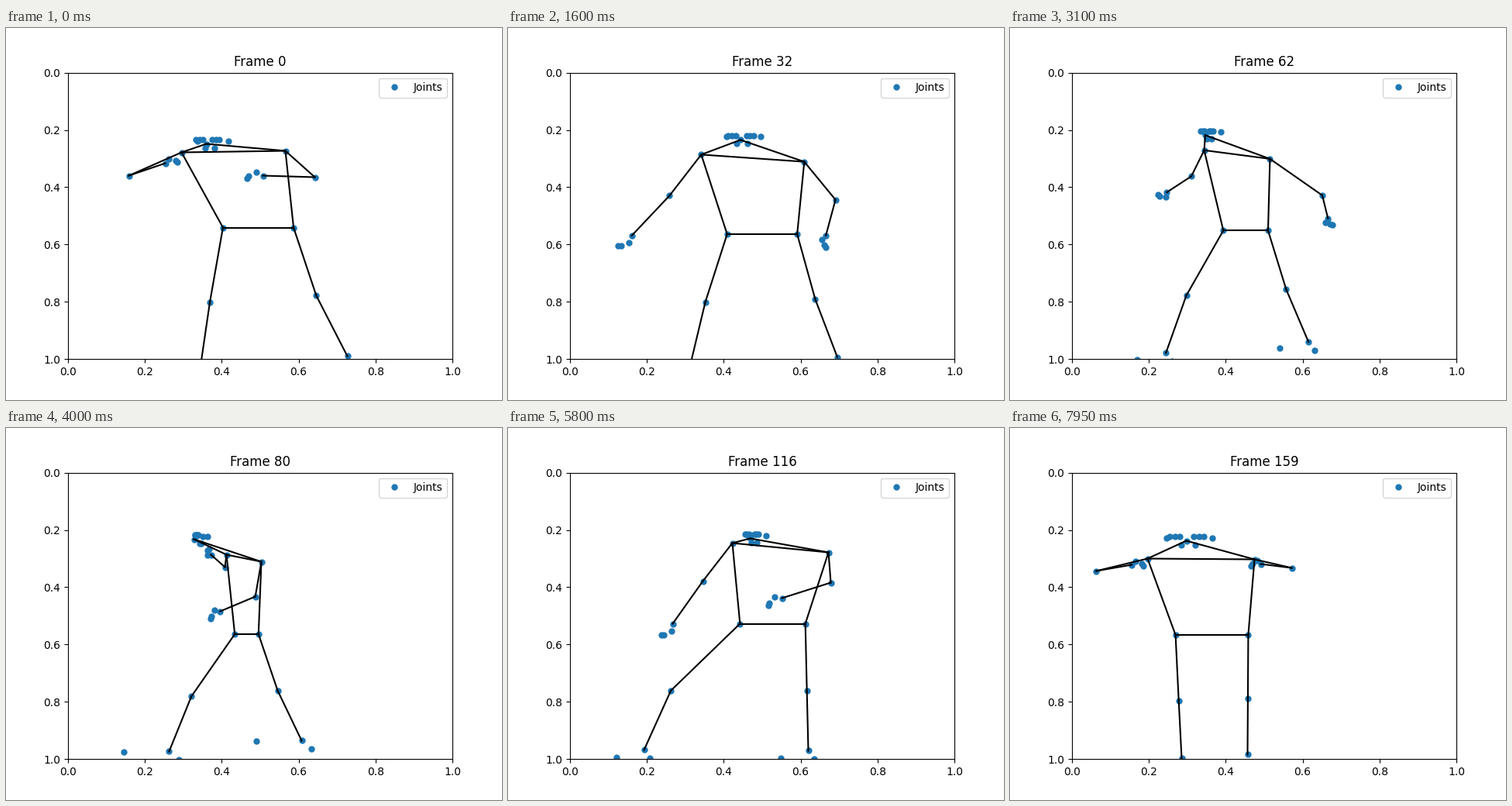
A matplotlib script that plays this animation: 640 by 480 pixels, repeating every 8 s.

```python
import numpy as np
import matplotlib.pyplot as plt
from matplotlib.animation import FuncAnimation

COUNT, STEP = 160, 50
BEATS = np.array([0, 18, 45, 80, 116, 137, 159])
TIMES = np.arange(COUNT)
RIGHT, LEFT = -1, 1


def glide(*v):
    """Smooth curve through one value per beat that never overshoots."""
    h = np.diff(BEATS)
    d = np.diff(v) / h
    a, b = d[:-1], d[1:]
    bend = np.where(a * b > 0, 2 * a * b / np.where(a * b > 0, a + b, 1), 0)
    m = np.concatenate([d[:1], bend, d[-1:]])
    i = np.clip(np.searchsorted(BEATS, TIMES, side="right") - 1, 0, len(h) - 1)
    s = (TIMES - BEATS[i]) / h[i]
    v = np.array(v, float)
    return (v[i] * (1 + 2 * s) * (1 - s) ** 2 + v[i + 1] * s * s * (3 - 2 * s)
            + h[i] * (m[i] * s * (1 - s) ** 2 + m[i + 1] * s * s * (s - 1)))


def at(x, y):
    return np.stack(np.broadcast_arrays(x, y, TIMES * 0.0)[:2], axis=1)


def track(*points):
    """Path in stage pixels through one point per beat."""
    x, y = zip(*points)
    return at(glide(*x), glide(*y))


def swing(when, width, reach):
    """Brief sideways throw."""
    return at(reach * np.exp(-((TIMES - when) / width) ** 2), 0)


# Key points: head, shoulders, and the joints of the limbs
nose = track((259, 150), (325, 157), (271, 134), (243, 144),
             (313, 143), (330, 156), (228, 146))
face = glide(10.5, 12.5, 10, 1.5, 6, 4, 15.5)
hip_x = glide(326, 358, 302, 311, 342, 393, 261)
shoulders = {
    RIGHT: track((227, 161), (281, 176), (222, 153), (285, 164),
                 (290, 149), (317, 172), (178, 169)),
    LEFT: track((361, 159), (414, 181), (349, 166), (330, 173),
                (414, 161), (379, 174), (316, 170))}
elbows = {
    RIGHT: track((159, 191), (230, 222), (190, 208), (283, 180),
                 (252, 198), (349, 208), (112, 185)),
    LEFT: track((399, 193), (460, 230), (375, 215), (321, 218),
                (417, 200), (489, 194), (364, 181))}
wrists = {
    RIGHT: track((206, 175), (185, 271), (146, 262), (265, 164),
                 (213, 253), (355, 221), (158, 177)),
    LEFT: track((332, 191), (449, 277), (356, 256), (275, 237),
                (354, 220), (518, 207), (324, 176))}
ankles = {
    RIGHT: track((251, 440), (284, 440), (194, 423), (210, 418),
                 (176, 416), (358, 440), (222, 427)) + swing(92, 6, 50),
    LEFT: track((441, 424), (456, 441), (394, 409), (382, 404),
                (388, 417), (402, 440), (307, 422))}
throws = {
    RIGHT: swing(152, 3, -100),
    LEFT: (swing(26, 3, 60) + swing(64, 7, 115) + swing(95, 7, 130)
           + swing(130, 2.5, 90) + swing(143, 2.5, 85))}

# The rest of the body follows from these
chest = (shoulders[LEFT] + shoulders[RIGHT]) / 2
width = shoulders[LEFT][:, 0] - shoulders[RIGHT][:, 0]
facing = nose[:, 0] - chest[:, 0]

joints = [nose]
bones = [(shoulders[LEFT], shoulders[RIGHT])]
hips = {}

for side in (RIGHT, LEFT):
    # Face: features slide across the head as it turns
    eye = nose + at(side * face - 0.05 * facing, -5.5)
    ear = nose + at(side * 1.9 * face - 0.23 * facing, -4)
    mouth = nose + at(side * 0.6 * face - 0.13 * facing, 5)
    corner = at(0.42 * face, 0)
    joints += [eye - corner, eye, eye + corner, ear, mouth]

    # Arm, with fingers fanned out beyond the wrist
    shoulder = shoulders[side]
    elbow = elbows[side] + 0.6 * throws[side]
    wrist = wrists[side] + throws[side]
    arm = wrist - elbow
    across = at(arm[:, 1], -arm[:, 0]) / np.hypot(*arm.T)[:, None]
    for along, fan in ((0.3, 4), (0.27, 1), (0.13, -4)):
        joints.append(wrist + along * arm + side * fan * across)

    # Leg: the knee bends more in a wide step
    hip = hips[side] = at(hip_x + side * 0.34 * width, chest[:, 1] + 98)
    ankle = ankles[side]
    leg = ankle - hip
    knee = hip + 0.53 * leg - at(leg[:, 0] ** 2 / 650, 0)
    heel = ankle + at(-0.2 * facing, 11)
    toe = ankle + at(0.9 * facing, 22 - 0.33 * abs(facing))

    joints += [shoulder, elbow, wrist, hip, knee, ankle, heel, toe]
    chain = [nose, shoulder, elbow, wrist]
    bones += list(zip(chain, chain[1:]))
    chain = [shoulder, hip, knee, ankle]
    bones += list(zip(chain, chain[1:]))

bones.append((hips[LEFT], hips[RIGHT]))


def to_axes(paths):
    """Stage pixels to the unit square of the plot."""
    return (np.array(paths) - 0.5 - (80, 57.6)) / (496, 369.6)


dots_at = to_axes(joints)
bones_at = to_axes(bones)

fig, ax = plt.subplots(figsize=(6.4, 4.8), dpi=100)
ax.set_xlim(0, 1)
ax.set_ylim(1, 0)
dots, = ax.plot([], [], "o", markersize=5, label="Joints")
lines = [ax.plot([], [], "k-")[0] for _ in bones]
title = ax.set_title("Frame 0")
ax.legend(loc="upper right")


def draw(n):
    dots.set_data(dots_at[:, n, 0], dots_at[:, n, 1])
    for line, ends in zip(lines, bones_at):
        line.set_data(ends[:, n, 0], ends[:, n, 1])
    title.set_text(f"Frame {n}")
    return [dots, *lines, title]


anim = FuncAnimation(fig, draw, frames=COUNT, interval=STEP,
                     repeat=True, repeat_delay=0)
plt.show()
```
